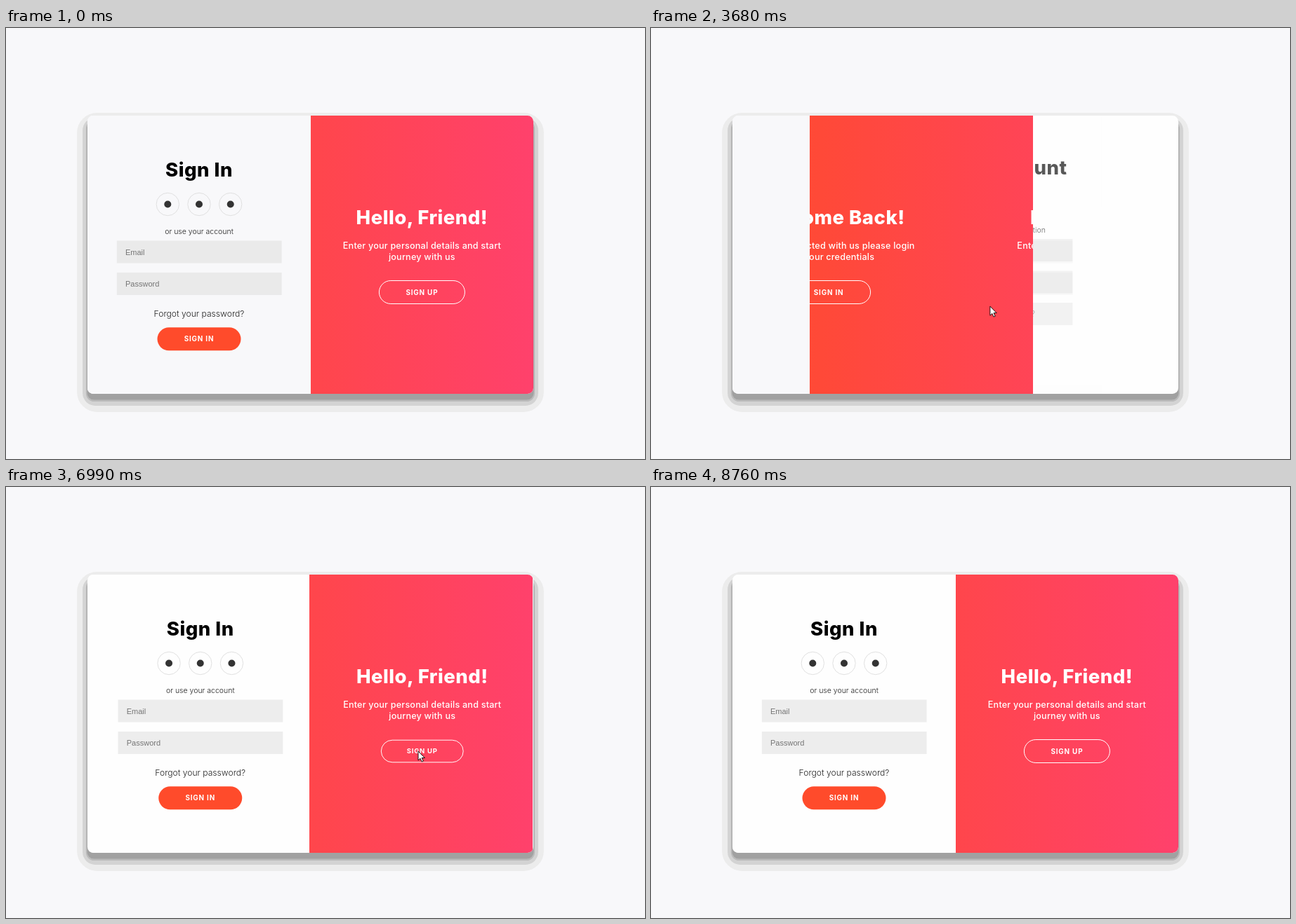
An HTML page for the animation above (9.52 s loop, 910 by 615 pixels).

```html
<!DOCTYPE html>
<html lang="en">
<head>
<meta charset="utf-8">
<title>Sign in / sign up slider</title>
<style>
  html, body { margin: 0; width: 100%; height: 100%; overflow: hidden; background: #f8f8fa; }
  svg { display: block; }
  text { font-family: Inter, "Open Sans", sans-serif; text-anchor: middle; }
  .title { font-size: 27.5px; font-weight: 800; letter-spacing: .5px; }
  .note { font-size: 10.5px; font-weight: 300; fill: #222; }
  .link { font-size: 12.1px; font-weight: 300; fill: #222; }
  .lead { font-size: 12.6px; font-weight: 500; letter-spacing: .2px; }
  .label { font-size: 9.9px; font-weight: 700; letter-spacing: .83px; fill: #fff; }
  .hint { font: 11px "Liberation Sans", Arial, sans-serif; text-anchor: start; fill: #757575; }
  .ring { fill: none; stroke: #ddd; stroke-width: .9; }
  .ghost { fill: none; stroke: #fff; stroke-width: 1; }
  .solid { fill: #ff4b2b; }
  .press { transform-box: fill-box; transform-origin: center; }
  #panel { fill: #fff; }
</style>
</head>
<body>
<svg width="910" height="615" viewBox="0 0 910 615">
  <defs>
    <linearGradient id="heat" gradientUnits="userSpaceOnUse" x1="116" y1="0" x2="751" y2="0">
      <stop stop-color="#ff4b2b"/><stop offset="1" stop-color="#ff416c"/>
    </linearGradient>
    <clipPath id="card"><rect x="116" y="125" width="635" height="397" rx="8.3"/></clipPath>
    <clipPath id="window"><rect id="slot" y="125" width="318" height="397"/></clipPath>
  </defs>
  <g id="shadow"></g>
  <g clip-path="url(#card)">
    <rect x="116" y="125" width="635" height="397" fill="#fefefe"/>
    <rect id="pale" x="116" y="125" width="318" height="397" fill="#f8f8fa"/>
    <g id="signIn"></g>
    <g id="signUp"></g>
    <g clip-path="url(#window)">
      <rect x="116" y="125" width="635" height="397" fill="url(#heat)"/>
      <g id="panel">
        <g id="back"></g>
        <g id="hello"></g>
      </g>
    </g>
  </g>
  <path id="cursor" d="M0 0V13L3 10.3L5.1 15L7.3 14L5.2 9.5H9.3Z"
        fill="#fff" stroke="#000" stroke-width=".9" stroke-linejoin="round"/>
</svg>
<script>
const LOOP = 9520, HALF = 317.4, LEFT = 116.3, MID = LEFT + HALF / 2;
const $ = id => document.getElementById(id);

// Markup helpers
const text = (cls, y, str, x = MID) => `<text class="${cls}" x="${x}" y="${y}">${str}</text>`;
const pill = (cls, x, y, w, str) => `<g class="press">
  <rect class="${cls}" x="${x - w / 2}" y="${y}" width="${w}" height="33" rx="16.5"/>
  ${text('label', y + 20.1, str, x)}</g>`;
const field = (y, str) =>
  `<rect class="field" x="157.8" y="${y}" width="234.8" height="32"/>${text('hint', y + 20, str, 170)}`;
const social = y => [-1, 0, 1].map(i =>
  `<circle class="ring" cx="${MID + i * 44.7}" cy="${y}" r="16.2"/>
   <circle cx="${MID + i * 44.7}" cy="${y}" r="5" fill="#333"/>`).join('');
const sheet = `<rect class="sheet" x="${LEFT}" y="125" width="${HALF}" height="397"/>`;

// Card shadow in four flat bands, widest and lightest first
for (let i = 3; i >= 0; i--) {
  const grow = .5 + 1.6 * i * i, grey = 161 + 25 * i;
  $('shadow').innerHTML += `<rect x="${116 - grow}" y="${133 + i - grow}" width="${635 + 2 * grow}"
    height="${397 + 2 * grow}" rx="${9 + 1.3 * grow}" fill="rgb(${grey},${grey},${grey})"/>`;
}

$('signIn').innerHTML = sheet + text('title', 211.7, 'Sign In') + social(251.5) +
  text('note', 294, 'or use your account') + field(303.5, 'Email') + field(349, 'Password') +
  text('link', 411.7, 'Forgot your password?') + pill('solid', MID, 427.3, 119, 'SIGN IN');

$('signUp').innerHTML = sheet + text('title', 209.4, 'Create Account') + social(249) +
  text('note', 291.6, 'or use your email for registration') +
  field(301, 'Name') + field(346.5, 'Email') + field(392, 'Password') +
  pill('solid', MID, 430.8, 122, 'SIGN UP');

const greet = (x, title, a, b, label, w) => text('title', 279.5, title, x) +
  text('lead', 314.8, a, x) + text('lead', 331.3, b, x) + pill('ghost', x, 360.5, w, label);
$('back').innerHTML = greet(MID, 'Welcome Back!',
  'To keep connected with us please login', 'with your credentials', 'SIGN IN', 119);
$('hello').innerHTML = greet(MID + HALF, 'Hello, Friend!',
  'Enter your personal details and start', 'journey with us', 'SIGN UP', 122);

// Releases of the panel buttons
const upClicks = [3325, 6963], inClicks = [4430, 7998];

// Cursor strokes: start, end, point reached, point the curve bends towards
const entry = [740, 609];
const strokes = [
  [190, 630, [256, 440], [330, 300]],
  [2640, 3020, [588, 378], [400, 450]],
  [3460, 3940, [272, 377], [510, 417]],
  [4570, 5000, [600, 383], [430, 392]],
  [5007, 5460, [717, 537], [780, 630]],
  [6110, 6770, [587, 377], [890, 574]],
  [7100, 7770, [264, 375], [420, 400]],
  [8100, 8650, [849, 607], [778, 519]]
];

const clamp = v => Math.min(1, Math.max(0, v));

// The picture advances in even steps
const STEP = 110.5, PHASE = 33.5;
const snap = t => PHASE + STEP * Math.floor((t + 8 - PHASE) / STEP);

// cubic-bezier(.42, 0, .58, 1)
function easeInOut(x) {
  if (x <= 0 || x >= 1) return clamp(x);
  let lo = 0, hi = 1, s;
  for (let i = 0; i < 24; i++) {
    s = (lo + hi) / 2;
    const v = 1.26 * s * (1 - s) ** 2 + 1.74 * s * s * (1 - s) + s ** 3;
    if (v < x) lo = s; else hi = s;
  }
  return s * s * (3 - 2 * s);
}

// 0 with the sign-in form showing, 1 with the sign-up form
const slide = t => upClicks.reduce((p, up, i) =>
  p + easeInOut((t - up) / 600) - easeInOut((t - inClicks[i]) / 600), 0);

// A button shrinks while held, 100 ms before its release
function scaleAt(t, clicks) {
  const part = from => clamp((t - from) / 80) ** 2;
  return clicks.reduce((k, c) => k - .05 * (part(c - 100) - part(c)), 1);
}

function tipAt(t) {
  let at = entry;
  for (const [from, to, end, bend] of strokes) {
    const u = clamp((t - from) / (to - from)), v = 1 - u;
    at = at.map((a, i) => v * v * a + 2 * u * v * bend[i] + u * u * end[i]);
    if (u < 1) break;
  }
  return at;
}

const move = (id, x, y = 0) => $(id).setAttribute('transform', `translate(${x} ${y})`);
const tint = (cls, c) => document.querySelectorAll(cls).forEach(e => e.setAttribute('fill', c));
const press = (id, k) => { $(id).querySelector('.press').style.transform = `scale(${k})`; };
const show = (id, on) => { $(id).style.display = on ? '' : 'none'; };

function draw(time) {
  const t = snap(time), p = slide(t);
  move('signIn', HALF * p);
  move('signUp', HALF * p);
  $('signUp').setAttribute('opacity', p >= .375 ? p : 0);
  $('slot').setAttribute('x', Math.round(LEFT + HALF * (1 - p)));
  move('back', -.2 * HALF * (1 - p));
  move('hello', .2 * HALF * p);
  press('hello', scaleAt(t, upClicks));
  press('back', scaleAt(t, inClicks));

  // The card is slightly grey until the first slide
  const early = t < 2750;
  tint('.sheet', early ? '#f8f8fa' : '#fefefe');
  tint('.field', early ? '#eaeaea' : '#ededed');
  show('pale', t < 3750);

  show('cursor', time >= 190 && t < 8755);
  move('cursor', ...tipAt(t));
}

const start = performance.now();
function tick() {
  draw((performance.now() - start) % LOOP);
  requestAnimationFrame(tick);
}
tick();
</script>
</body>
</html>
```
